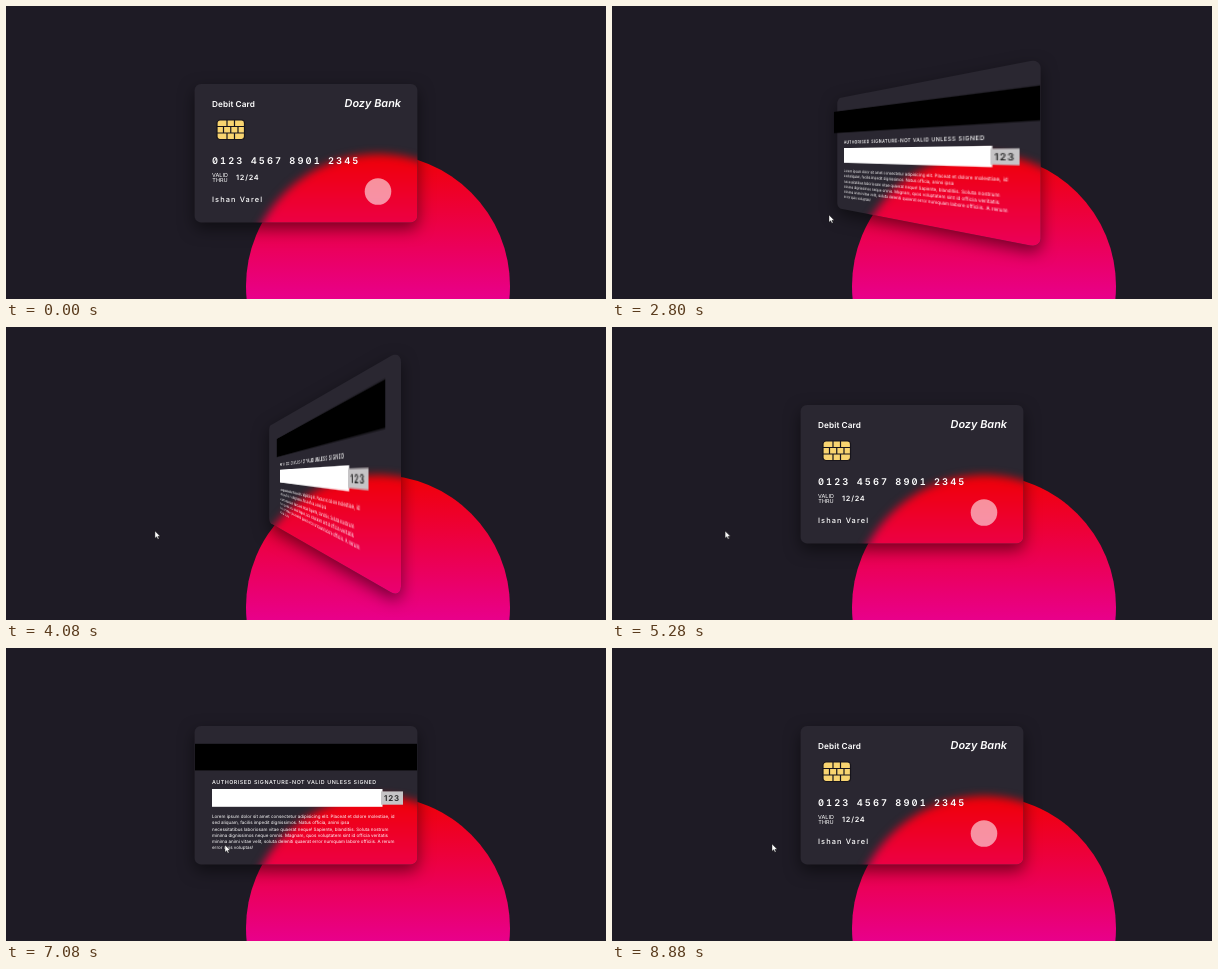
Recreate the animation shown at these times as an HTML page. Size 600x293 px, loop 8.92 s.

```html
<!DOCTYPE html>
<html lang="en">
<head>
<meta charset="utf-8">
<title>Flipping glass card</title>
<style>
  @property --turn { syntax: "<angle>"; inherits: true; initial-value: 0deg; }

  html, body { margin: 0; width: 100%; height: 100%; overflow: hidden; background: #1e1b25; }
  .stage { position: relative; width: 600px; height: 293px; overflow: hidden; background: #1e1b25; }

  .sun {
    position: absolute; left: 240px; top: 147.5px; width: 264px; height: 264px;
    border-radius: 50%; background: linear-gradient(#f00005, #e200f8);
  }
  .pane { position: absolute; inset: 0; filter: drop-shadow(0 6.7px 7.75px rgba(0, 0, 0, .5)); }
  .glass { position: absolute; inset: 0; overflow: hidden; background: #2a2731; }
  .glass .sun { filter: blur(4px); }

  .card {
    position: absolute; left: 189px; top: 78px; width: 222px; height: 138px;
    animation: flip 8920ms infinite;
  }
  .face {
    position: absolute; inset: 0; border-radius: 6.7px; backface-visibility: hidden;
    will-change: transform;
    transform: perspective(222px) rotateY(var(--turn));
  }
  .back { transform: perspective(222px) rotateY(calc(var(--turn) - 180deg)); }
  .face svg { display: block; width: 222px; height: 138px; }

  text { font-family: Inter, "Open Sans", sans-serif; fill: #fff; text-rendering: geometricPrecision; }
  .title { font-size: 8.2px; font-weight: 600; letter-spacing: .1px; }
  .bank { font-size: 10.9px; font-weight: 600; font-style: italic; text-anchor: end; }
  .number {
    font-size: 9.3px; font-weight: 600; letter-spacing: 2.1px; word-spacing: 1.6px;
    font-feature-settings: "tnum", "zero";
  }
  .valid { font-size: 5.5px; text-anchor: middle; }
  .date { font-size: 7.3px; font-weight: 600; letter-spacing: .75px; }
  .holder { font-size: 7.4px; font-weight: 500; letter-spacing: 1.1px; }
  .notice { font-size: 5.4px; font-weight: 500; letter-spacing: .5px; }
  .code { font-size: 8px; font-weight: 600; letter-spacing: .8px; fill: #222; }
  .small { font-size: 4.5px; }

  .cursor {
    position: absolute; left: 0; top: 0; width: 8px; height: 10px; overflow: visible;
    animation: roam 8920ms linear infinite;
  }

  @keyframes flip {
    0%, 25.36% { --turn: 0deg; animation-timing-function: ease; }
    36.57%, 43.12% { --turn: 180deg; animation-timing-function: ease; }
    54.33%, 67.04% { --turn: 0deg; animation-timing-function: ease; }
    78.25%, 83.21% { --turn: 180deg; animation-timing-function: ease; }
    94.42%, 100% { --turn: 0deg; }
  }
  @keyframes roam {
    0%, 9.64% { transform: translate(-8px, 212px); }
    19.96% { transform: translate(150px, 212px); }
    25.1% { transform: translate(189px, 210px); }
    28.7%, 39.2% { transform: translate(217px, 209px); }
    43.1% { transform: translate(189px, 207px); }
    45.74% { transform: translate(149px, 204px); }
    50.9% { transform: translate(110px, 204px); }
    54.9% { transform: translate(98px, 204px); }
    59.19% { transform: translate(113px, 204px); }
    61.4% { transform: translate(138px, 202px); }
    67% { transform: translate(189px, 199px); }
    70.6%, 80.3% { transform: translate(219px, 197px); }
    83.1% { transform: translate(189px, 197px); }
    87.44% { transform: translate(90px, 196px); }
    91.9% { transform: translate(82px, 196px); }
    95.3% { transform: translate(100px, 196px); }
    99.55%, 100% { transform: translate(160px, 196px); }
  }
</style>
</head>
<body>
<div class="stage">
  <div class="sun"></div>
  <div class="pane">
    <div class="glass"><div class="sun"></div></div>
  </div>

  <div class="card">
    <div class="face">
      <svg viewBox="0 0 222 138">
        <text class="title" x="17" y="22.7">Debit Card</text>
        <text class="bank" x="206" y="22.9">Dozy Bank</text>
        <g transform="translate(22 36)" stroke="#17141c" stroke-width="1.2" fill="none">
          <rect width="27.5" height="19.5" rx="3" fill="#f8d470" />
          <path d="M0 6.5H27.5M0 13H27.5M10 0V6.5M17.5 0V6.5M6.5 6.5V13M13.75 6.5V13M21 6.5V13M10 13V19.5M17.5 13V19.5" />
        </g>
        <text class="number" x="17" y="79.6">0123 4567 8901 2345</text>
        <text class="valid" x="25" y="92.6">VALID</text>
        <text class="valid" x="25" y="98.3">THRU</text>
        <text class="date" x="41" y="95.7">12/24</text>
        <text class="holder" x="17" y="118">Ishan Varel</text>
        <circle cx="183" cy="107.5" r="13.3" fill="#fff" fill-opacity=".57" />
      </svg>
    </div>
    <div class="face back">
      <svg viewBox="0 0 222 138">
        <rect y="17.8" width="222" height="26.6" />
        <text class="notice" x="17" y="57.7">AUTHORISED SIGNATURE-NOT VALID UNLESS SIGNED</text>
        <rect x="17" y="63" width="170.5" height="17.8" fill="#fff" />
        <rect x="186" y="65.4" width="22" height="13.3" fill="#c6c4c6" />
        <text class="code" x="189" y="75">123</text>
        <g class="small">
          <text x="17" y="92.2">Lorem ipsum dolor sit amet consectetur adipisicing elit. Placeat et dolore molestiae, id</text>
          <text x="17" y="98.4">sed aliquam, facilis impedit dignissimos. Natus officia, animi ipsa</text>
          <text x="17" y="104.6">necessitatibus laboriosam vitae quaerat neque! Sapiente, blanditiis. Soluta nostrum</text>
          <text x="17" y="110.8">minima dignissimos neque omnis. Magnam, quos voluptatem sint id officia veritatis</text>
          <text x="17" y="117">minima animi vitae velit, soluta deleniti quaerat error numquam labore officiis. A rerum</text>
          <text x="17" y="123.2">error quis voluptas!</text>
        </g>
      </svg>
    </div>
  </div>

  <svg class="cursor" viewBox="0 0 8 10">
    <path d="M0 0V7.2L1.7 5.7 2.9 8.3 4 7.8 2.9 5.3H5.2Z" fill="#fff" stroke="#111" stroke-width=".4" />
  </svg>
</div>

<script>
  const card = document.querySelector(".card");
  const glass = document.querySelector(".glass");
  const DEPTH = 222, HALF_W = 111.4, HALF_H = 69.3, RADIUS = 6.7, STEPS = 6;

  // Rounded card outline, relative to its centre.
  const outline = [];
  for (const [i, [sx, sy]] of [[1, 1], [-1, 1], [-1, -1], [1, -1]].entries()) {
    for (let s = 0; s <= STEPS; s++) {
      const a = (i + s / STEPS) * Math.PI / 2;
      outline.push([
        sx * (HALF_W - RADIUS) + RADIUS * Math.cos(a),
        sy * (HALF_H - RADIUS) + RADIUS * Math.sin(a)
      ]);
    }
  }

  // Clip the blurred backdrop to the card as seen in perspective.
  function clipGlass() {
    const turn = parseFloat(getComputedStyle(card).getPropertyValue("--turn")) * Math.PI / 180;
    const points = outline.map(([x, y]) => {
      const k = DEPTH / (DEPTH + x * Math.sin(turn));
      return `${(300 + x * Math.cos(turn) * k).toFixed(2)}px ${(147.2 + y * k).toFixed(2)}px`;
    });
    glass.style.clipPath = `polygon(${points})`;
    requestAnimationFrame(clipGlass);
  }
  clipGlass();
</script>
</body>
</html>
```
